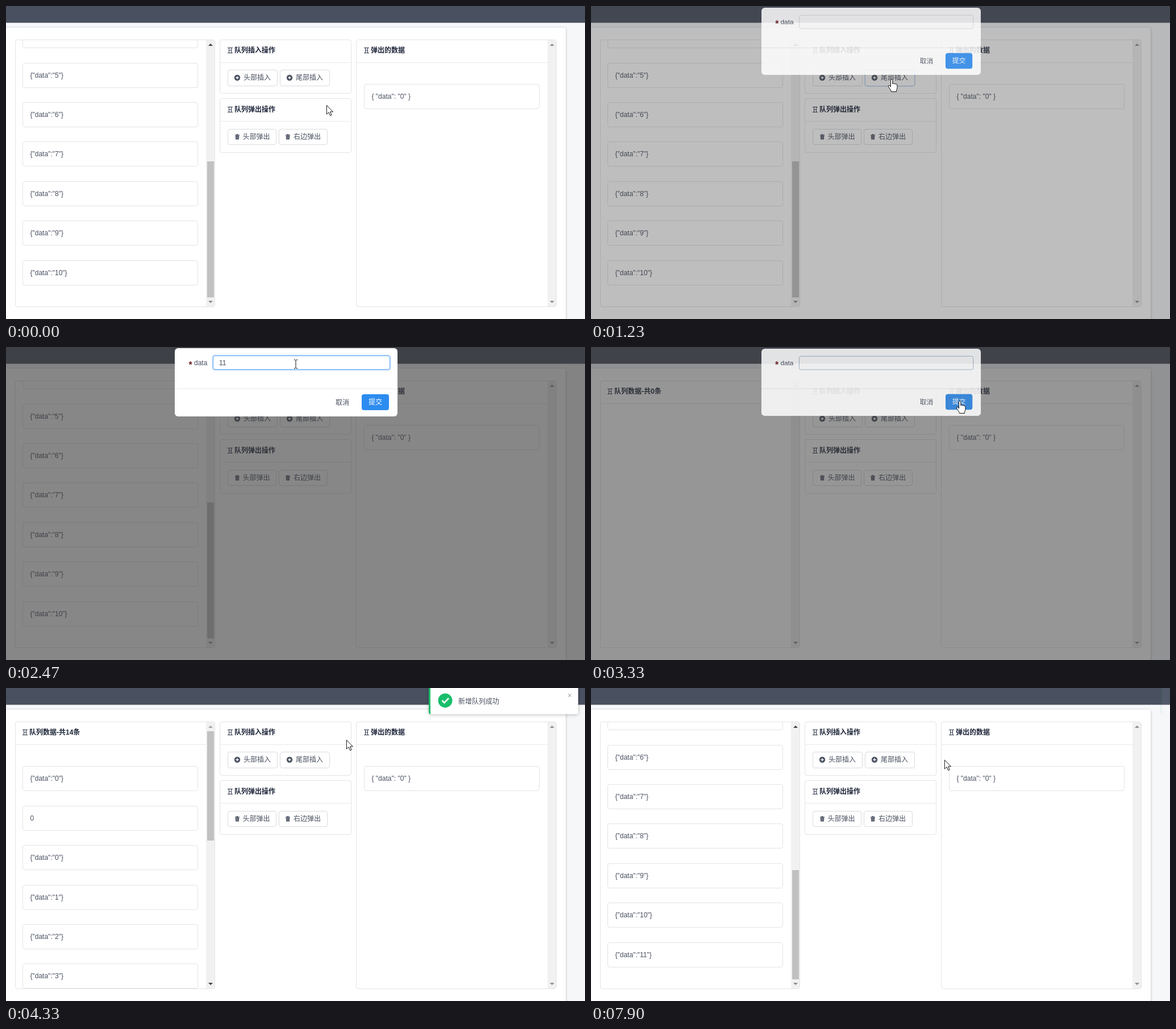
An HTML page for the animation above (8220 ms loop, 1019 by 550 pixels).

```html
<!DOCTYPE html>
<html lang="zh">
<head>
<meta charset="utf-8">
<style>
html, body { margin: 0; width: 100%; height: 100%; overflow: hidden; background: #f5f7f9; }
body { position: relative; font: 12px/20px 'Liberation Sans', 'Noto Sans CJK SC', 'Noto Sans CJK', sans-serif; color: #495060; }
div, svg { position: absolute; box-sizing: border-box; }
svg { overflow: visible; width: 1px; height: 1px; fill: none; stroke: #495060; }
.text { white-space: pre; height: 20px; }
.title { font-weight: bold; color: #1c2438; }
.star { font-size: 16px; font-weight: bold; color: #702020; }
.panel { background: #fff; border: 1px solid #e2e4e7; border-radius: 4px; }
.btn, .field { background: #fff; border: 1px solid #d9dbdf; border-radius: 4px; }
.rule { background: #e9eaec; }
.track { background: #f1f1f1; }
#top { background: #495060; border-bottom: 1px solid #a0a4ae; }
#card { background: #fff; border-radius: 4px; box-shadow: 0 1px 4px rgba(0,0,0,.25); }
#view { overflow: hidden; }
#mask { background: rgba(55,55,55,.6); }
#modal { background: #fff; border-radius: 6px; }
#submit { background: #2d8cf0; border-radius: 4px; color: #fff; }
#notice { background: #fff; border-left: 3px solid #19be6b; border-radius: 4px; box-shadow: 0 1px 6px rgba(0,0,0,.25); }
</style>
</head>
<body>
<script>
const LOOP = 8220, PITCH = 69.4, VIEW = 468, TRACK = 436;

const box = (x, y, w, h, cls = '', inner = '', id = '') =>
  `<div id="${id}" class="${cls}" style="left:${x}px;top:${y}px;width:${w}px;height:${h}px">${inner}</div>`;
const text = (x, mid, str, cls = '', id = '') =>
  `<div id="${id}" class="text ${cls}" style="left:${x}px;top:${mid - 10}px">${str}</div>`;
const icon = (x, y, paths, id = '') =>
  `<svg id="${id}" style="left:${x}px;top:${y}px">${paths}</svg>`;

const plus = '<circle r="5.2" fill="#495060" stroke="none"/><path d="M-2.7 0H2.7M0-2.7V2.7" stroke="#fff" stroke-width="1.3"/>';
const trash = '<path d="M-4-3.2H4M-1.3-4.3H1.3" stroke-width="1.2"/><path d="M-3.3-2.2H3.3L2.9 4.5H-2.9Z" fill="#495060" stroke="none"/><path d="M-1.2-1V3.3M1.2-1V3.3" stroke="#fff" stroke-width=".5"/>';
const film = '<path d="M0-4.5H9M0 4.5H9M2.5-4.5V4.5M6.5-4.5V4.5M2.5 0H6.5" stroke="#1c2438" stroke-width=".9"/>';

const title = (x, mid, str, id) => icon(x, mid, film) + text(x + 12, mid, str, 'title', id);
const button = (x, y, w, h, glyph, label, id) =>
  box(x, y, w, h, 'btn', '', id) + icon(x + 16.5, y + 14, glyph) + text(x + (w > 87 ? 28 : 26.5), y + 14, label);
const row = (x, y, str) => box(x, y, 309, 44, 'panel', text(12.5, 21, str));
const arrow = (x, y, dir, id) =>
  icon(x, y, `<path d="M-4 ${2 * dir}H4L0 ${-2 * dir}Z" fill="currentColor" stroke="none"/>`, id);
const scrollbar = (x, id) => box(x, 60, 15, VIEW, 'track') +
  arrow(x + 7.5, 68, 1, id + 'Up') + arrow(x + 7.5, 519.5, -1, id + 'Down');

const modal =
  text(24.5, 29.5, '*', 'star') + text(34, 26, 'data') +
  box(67, 13, 312, 25, 'field', text(10, 11.5, '', '', 'typed'), 'field') +
  box(0, 71, 392, 1, 'rule') + text(283, 95.5, '取消') +
  box(329, 81, 48, 28, '', text(12, 14, '提交'), 'submit');

const notice =
  icon(25.5, 31.5, '<circle r="12.5" fill="#19be6b" stroke="none"/><path d="M-5.5 0L-1.5 4L6-4" stroke="#fff" stroke-width="2.6"/>') +
  text(49, 34, '新增队列成功') +
  icon(244.5, 22.5, '<path d="M-3-3L3 3M3-3L-3 3" stroke="#999"/>');

const shapes = {
  arrow: '<path d="M.3.5V16.2L4 12.8L6.6 18.7L9 17.6L6.5 11.9H11.4Z" fill="#fff" stroke="#111"/>',
  hand: '<path d="M-1.6 1.5a1.7 1.7 0 0 1 3.4 0V8c0-1.6 3-1.5 3 .2c.3-1.2 2.7-1 2.7.6c.5-.9 2.4-.5 2.4 1V14.5c0 2-1.5 3.5-1.5 7H-.5C-1 18-5.5 14-5.8 12c-.2-1.8 2-2 2.8-.8L-1.6 13Z" fill="#fff" stroke="#111"/>',
  beam: '<path d="M-3-7.5H-1L0-6.5L1-7.5H3M0-6.5V6.5M-3 7.5H-1L0 6.5L1 7.5H3" stroke="#111"/>'
};

document.body.innerHTML =
  box(0, 0, 1019, 30, '', '', 'top') + box(-10, 38, 995, 530, '', '', 'card') +
  box(16, 59, 352, 470, 'panel') + box(17, 60, 336, VIEW, '', box(0, 0, 336, 0, '', '', 'list'), 'view') +
  scrollbar(352, 'left') + box(354, 76, 12, 0, '', '', 'thumb') +
  box(376, 59, 232, 95, 'panel') + box(377, 99, 230, 1, 'rule') + title(390, 77.5, '队列插入操作') +
  button(390, 112, 88, 29, plus, '头部插入') + button(482, 112, 88, 29, plus, '尾部插入', 'append') +
  box(376, 162, 232, 96, 'panel') + box(377, 202, 230, 1, 'rule') + title(390, 181.5, '队列弹出操作') +
  button(390, 216, 86, 28, trash, '头部弹出') + button(479.5, 216, 86, 28, trash, '右边弹出') +
  box(616, 59, 353, 470, 'panel') + box(617, 99, 336, 1, 'rule') + title(630, 77.5, '弹出的数据') +
  row(630, 137.4, '{ "data": "0" }') + scrollbar(953, 'right') +
  box(0, 0, 1019, 550, '', '', 'mask') + box(297, 2, 392, 120, '', modal, 'modal') +
  box(744, -10, 263, 56, '', notice, 'notice') + icon(0, 0, '', 'cursor');

const $ = id => document.getElementById(id);
const clamp = v => Math.max(0, Math.min(1, v));
// Number of steps taken when n steps run from a to b, the first one at a.
const steps = (t, a, b, n) =>
  Math.max(0, Math.min(n, Math.floor((t - a) / (b - a || 1) * Math.max(1, n - 1) + .12) + 1));

// Pointer moves: start, end, step count, target x, target y, easing.
const smooth = p => p * p * (3 - 2 * p), easeOut = p => 1 - (1 - p) ** 2;
const moves = [
  [370, 760, 6, 529, 129, easeOut],
  [1540, 2310, 11, 510, 30, smooth],
  [2550, 2860, 5, 649, 95, smooth],
  [4330, 4330, 1, 599, 91, smooth],
  [4410, 5100, 10, 361, 188, easeOut],
  [5190, 5880, 10, 302, 432, smooth],
  [6200, 6660, 7, 619, 122, smooth],
  [6810, 6810, 1, 622, 126, smooth]
];

function pointer(t) {
  let x = 564, y = 174;
  for (const [a, b, n, tx, ty, ease] of moves) {
    const p = ease(steps(t, a, b, n) / n);
    x += (tx - x) * p;
    y += (ty - y) * p;
  }
  return [x, y];
}

const wrap = n => `{"data":"${n}"}`;
const before = Array.from({ length: 11 }, (_, i) => wrap(i));
const lists = [before, [], [wrap(0), '0', ...before, wrap(11)]];
let shownList, shownCursor;

function showList(index, t) {
  const items = lists[index];
  if (shownList !== index) {
    shownList = index;
    $('list').innerHTML = title(12, 17.5, `队列数据-共${items.length}条`) + box(0, 39, 336, 1, 'rule') +
      items.map((s, i) => row(12, 77.4 + PITCH * i, s)).join('');
  }
  const total = 89.5 + PITCH * items.length, max = Math.max(0, total - VIEW);
  const scroll = max * (index ? smooth(steps(t, 5190, 5880, 10) / 10) : 1);
  const thumb = $('thumb').style;
  $('list').style.top = -scroll + 'px';
  thumb.top = 76 + scroll * TRACK / total + 'px';
  thumb.height = max ? TRACK * VIEW / total + 'px' : 0;
  thumb.background = t >= 5180 && t < 6030 ? '#787878' : t >= 5020 && t < 5180 ? '#a8a8a8' : '#c1c1c1';
  $('leftUp').style.color = scroll > 0 ? '#404040' : '#a3a3a3';
  $('leftDown').style.color = scroll < max - 1 ? '#404040' : '#8a8a8a';
}

function render(t) {
  const open = steps(t, 1000, 1390, 6), close = steps(t, 3160, 3630, 7);
  showList(close < 2 ? 0 : close < 5 ? 1 : 2, t);

  const p = clamp((open - 2) / 4), q = clamp((close - 2) / 4);
  const fade = close ? 1 - q ** 1.37 : 1 - (1 - p) ** 2.7;
  $('mask').style.opacity = close ? 1 - q ** 1.5 : p ** .9;
  $('modal').style.opacity = fade;
  $('modal').style.transform = `scale(${.9 + .1 * fade})`;

  const focused = t >= 2230 && !close, hover = t >= 680 && t < 1000, ring = t >= 990 && t < 2230;
  $('field').style.borderColor = focused ? '#57a3f3' : close ? '#9db4cc' : '';
  $('field').style.boxShadow = focused ? '0 0 0 2px rgba(45,140,240,.2)' : '';
  $('typed').textContent = close ? '' : '1'.repeat(steps(t, 2400, 2480, 2));
  $('submit').style.background = close ? '#2b85e4' : t >= 2850 ? '#57a3f3' : '';
  $('append').style.borderColor = hover ? '#57a3f3' : ring ? '#b4cde6' : '';
  $('append').style.boxShadow = ring ? '0 0 0 1px rgba(45,140,240,.2)' : '';

  const enter = easeOut(clamp((close - 4) / 3)), leave = (steps(t, 7740, 7900, 3) / 3) ** 1.5;
  $('notice').style.opacity = enter * (1 - .95 * leave);
  $('notice').style.transform = `translateX(${(1 - enter) * 275 + leave * 258}px)`;

  const [x, y] = pointer(t);
  const hand = t >= 680 && t < 1535 || t >= 2850 && close < 6;
  const kind = hand ? 'hand' : t >= 1535 && t < 2850 && y < 41 ? 'beam' : 'arrow';
  if (shownCursor !== kind) $('cursor').innerHTML = shapes[shownCursor = kind];
  $('cursor').style.transform = `translate(${Math.round(x)}px,${Math.round(y)}px)`;
}

$('rightUp').style.color = $('rightDown').style.color = '#8e8e8e';
const start = performance.now();
function tick() {
  render((performance.now() - start) % LOOP);
  requestAnimationFrame(tick);
}
tick();
</script>
</body>
</html>
```
